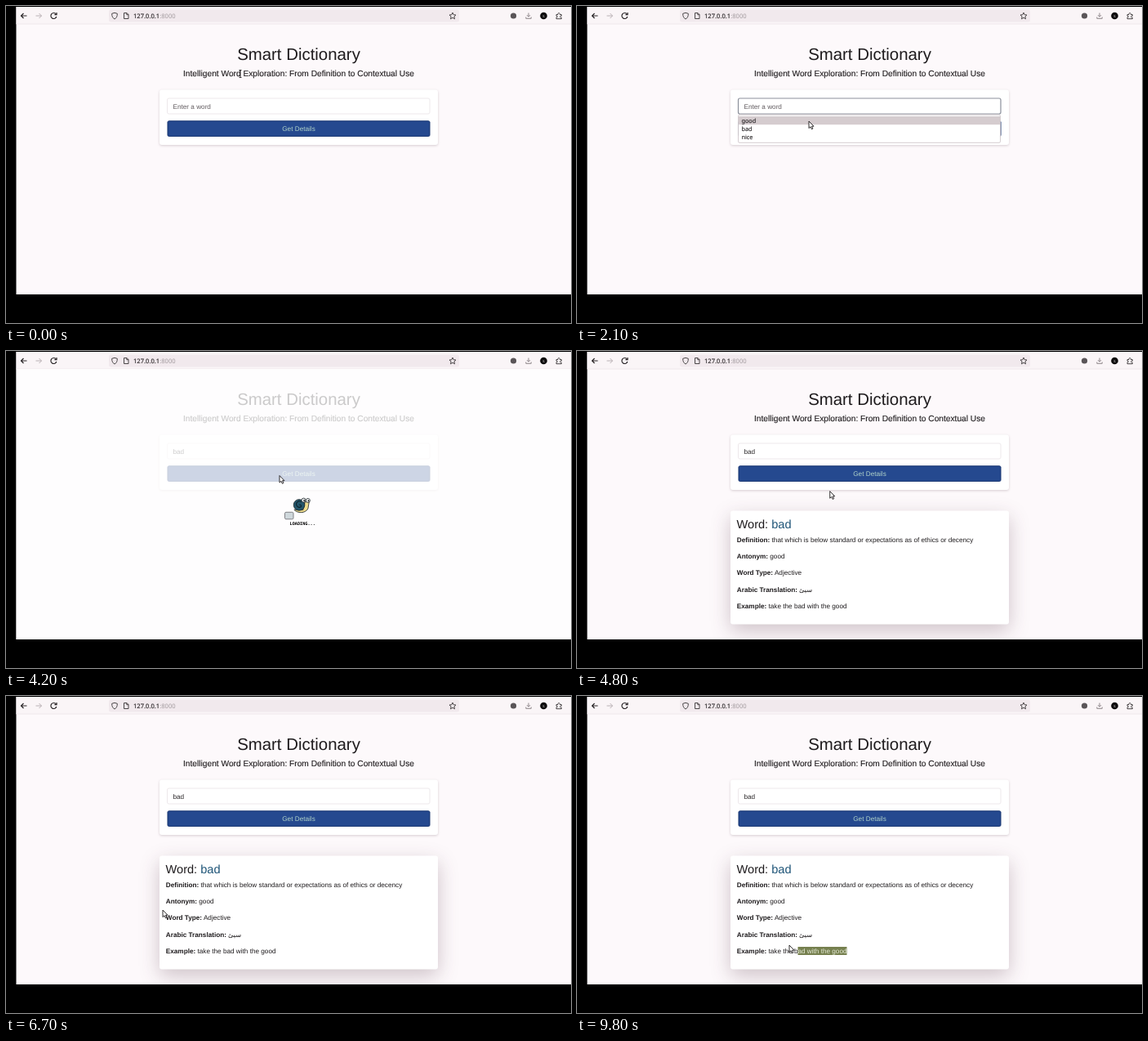
Write an HTML page that moves like this. It is 692 px wide and 388 px high and loops after 9.9 s.

```html
<!DOCTYPE html>
<html lang="en">
<head>
<meta charset="utf-8">
<title>Smart Dictionary</title>
<style>
  html, body { margin: 0; width: 100%; height: 100%; overflow: hidden; background: #000; }
  svg { display: block; width: 692px; height: 388px; text-rendering: geometricPrecision;
        font: 8.2px "Liberation Sans", Arial, sans-serif; }
  text { white-space: pre; }
  .b { font-weight: 700; }
  .mid { text-anchor: middle; }
  .ui { font-family: "Noto Sans", sans-serif; }
  .line { fill: none; stroke: #4a4648; stroke-width: 1; }
  .card { fill: #fff; filter: drop-shadow(0 1px 1.5px rgba(60, 30, 45, .2)); }
  .raised { fill: #fff; filter: drop-shadow(0 8px 12px rgba(60, 20, 40, .24)); }
</style>
</head>
<body>
<svg viewBox="0 0 692 388">
  <defs>
    <clipPath id="view"><rect x="12.5" y="22" width="680" height="331"/></clipPath>
    <clipPath id="selClip"><rect id="selArea"/></clipPath>
  </defs>
  <rect width="692" height="388"/>
  <rect x="12.5" y="1" width="680" height="352" fill="#fdf9fb"/>

  <!-- browser toolbar -->
  <rect x="12.5" y="1" width="680" height="21" fill="#faf5f7"/>
  <path d="M12.5 22H692" stroke="#ece4e8" stroke-width=".8"/>
  <rect x="126" y="4.5" width="429" height="15" rx="2.5" fill="#f1e9ed"/>
  <g class="line">
    <path d="M25.5 12H18.5M21.5 9L18.5 12L21.5 15" stroke="#2a2628" stroke-width="1.2"/>
    <path d="M36.5 12H43.5M40.5 9L43.5 12L40.5 15" stroke="#b9b1b5"/>
    <path d="M61 9.6A3.5 3.5 0 1 0 61.8 13M62 8V10.6H59.4" stroke="#2a2628" stroke-width="1.2"/>
    <path d="M133 8.3L136.3 9.3C136.4 12.5 135.5 14.6 133 16C130.5 14.6 129.6 12.5 129.7 9.3Z"/>
    <path d="M144.5 8.5H148L150 10.5V15.5H144.5ZM147.8 8.5V10.7H150"/>
    <path d="M547 8L548.2 10.7L551 11L548.9 12.9L549.5 15.8L547 14.3L544.5 15.8L545.1 12.9L543 11L545.8 10.7Z"/>
    <path d="M640 8.5V13M638 11.2L640 13.2L642 11.2M636.8 13.5V15.3H643.2V13.5" stroke="#8d8589"/>
    <path d="M674 10.5H676C675.5 7.8 678.8 7.8 678.3 10.5H680.3V12.2C677.9 11.8 677.9 14.6 680.3 14.2V15.7H674V13.9C676 14 676 12 674 12.2Z"/>
  </g>
  <circle cx="621.5" cy="12" r="3.6" fill="#5a5558"/>
  <circle cx="658.5" cy="12" r="4.3" fill="#0c0a0b"/>
  <text class="ui mid" x="658.5" y="13.9" font-size="5" fill="#ddd">s</text>
  <text class="ui" x="156" y="14.8" font-size="7.6" fill="#2b2729" stroke="#2b2729" stroke-width=".15">127.0.0.1<tspan fill="#a39b9f" stroke="none">:8000</tspan></text>

  <g clip-path="url(#view)">
    <g fill="#1e1b1d">
      <text class="mid" x="358.5" y="65.8" font-size="20.4">Smart Dictionary</text>
      <text class="mid" x="358.5" y="86.3" font-size="10.2" stroke="#1e1b1d" stroke-width=".12">Intelligent Word Exploration: From Definition to Contextual Use</text>
    </g>
    <rect class="card" x="188" y="102.5" width="341" height="67.5" rx="3"/>
    <rect id="field" x="197.5" y="113" width="321.5" height="19" rx="2" fill="#fff"/>
    <text id="entry" x="204.5" y="125.8"></text>
    <rect x="198" y="140.8" width="321" height="18.6" rx="1.5" fill="#25498f" stroke="#17346f"/>
    <text class="mid" x="358.5" y="153" fill="#b0d2c8">Get Details</text>

    <g id="list">
      <rect x="197.5" y="133.3" width="321" height="34" rx="1.5" fill="#fff" stroke="#c9c1c5" stroke-width=".8"/>
      <rect id="hover" x="198" width="320" height="10.2" fill="#d5cccf"/>
      <g class="ui" font-size="7.25" fill="#1e1b1d" stroke="#1e1b1d" stroke-width=".1">
        <text x="201.5" y="142.7">good</text>
        <text x="201.5" y="152.9">bad</text>
        <text x="201.5" y="163.1">nice</text>
      </g>
    </g>

    <g id="result">
      <rect class="raised" x="188" y="195.5" width="341" height="139" rx="3"/>
      <g fill="#1e1b1d">
        <g id="rows">
          <text x="195.5" y="217.2" font-size="14.6">Word: <tspan fill="#1f5578">bad</tspan></text>
          <text x="195.8" y="233.7"><tspan class="b">Definition:</tspan> that which is below standard or expectations as of ethics or decency</text>
          <text x="195.8" y="254"><tspan class="b">Antonym:</tspan> good</text>
          <text x="195.8" y="274.3"><tspan class="b">Word Type:</tspan> Adjective</text>
          <text x="195.8" y="294.6" class="b">Arabic Translation:</text>
          <text x="272" y="294.6" font-family="DejaVu Sans, sans-serif">سيئ</text>
          <text x="195.8" y="314.8"><tspan class="b">Example:</tspan> take the bad with the good</text>
        </g>
      </g>
      <g clip-path="url(#selClip)" fill="#e6ead8">
        <rect x="188" y="195" width="341" height="139" fill="#76804f"/>
        <use href="#rows"/>
      </g>
    </g>

    <g id="loading">
      <rect x="12" y="22" width="680" height="331" fill="#fff" opacity=".77"/>
      <rect id="tray" x="341.5" y="197.3" height="8.5" rx="1.5" fill="#cfd8dc" stroke="#77777c" stroke-width=".9"/>
      <g id="snail" stroke="#1b2428" stroke-width=".8">
        <path d="M353 194C357 198.5 367 198.5 370 192L371 184H366L364 194Z" fill="#efdc8d"/>
        <circle cx="359" cy="188" r="6.8" fill="#24566b"/>
        <path d="M359 188A1.6 1.6 0 0 1 361.4 190A3.6 3.6 0 1 1 361.6 184.5" fill="none" stroke="#0c2029" stroke-width="1"/>
        <circle cx="364.3" cy="182" r="2.5" fill="#fff"/>
        <circle cx="369.6" cy="182.2" r="2.5" fill="#fff"/>
        <circle cx="365" cy="182.3" r=".7"/>
        <circle cx="370.2" cy="182.5" r=".7"/>
      </g>
      <text id="label" x="348" y="213" font-size="5.2" class="b" font-family="DejaVu Sans Mono, monospace">LOADING...</text>
    </g>
  </g>

  <path id="beam" d="M-1.5 -4.5H1.5M0 -4.5V4.5M-1.5 4.5H1.5" fill="none" stroke="#2a2628" stroke-width=".9"/>
  <path id="arrow" d="M0 0V8.6L2 6.8L3.4 9.8L4.9 9.1L3.5 6.2H6Z" fill="#fff" stroke="#1a1718" stroke-width=".9"/>
</svg>
<script>
const LOOP = 9900, STEP = 100;
const $ = id => document.getElementById(id);
const set = (id, attrs) => { for (const k in attrs) $(id).setAttribute(k, attrs[k]); };
const show = (id, on) => { $(id).style.display = on ? "" : "none"; };
const mix = (a, b, u) => a + (b - a) * Math.min(1, Math.max(0, u));

// pointer stops: time, x, y
const stops = [
  [0, 287, 83], [1000, 287, 83], [1300, 286, 124], [1800, 286, 124],
  [2000, 284, 141], [2200, 284, 141], [2300, 284, 149], [2400, 284, 149],
  [2700, 335, 152.5], [4700, 335, 152.5], [5100, 234, 229], [5200, 234, 230],
  [5600, 273, 236], [5800, 290, 242], [6000, 290, 242], [6100, 270, 216],
  [6200, 270, 216], [6400, 197, 215], [6500, 197, 215], [6700, 192, 262],
  [6900, 192, 268], [7500, 271, 279], [7600, 271, 279], [7700, 281, 278],
  [8600, 281, 278], [8800, 196, 289], [9000, 287, 290], [9200, 336, 291],
  [9300, 336, 291], [9500, 331, 309], [9800, 260, 305]
];

// text drags: start, full, cleared, anchor x, moving x from, to, top, height
const drags = [
  [5200, 5600, 5700, 234, 234, 265.5, 226, 10],
  [5700, 5800, 6100, 234, 350, 485, 226, 10],
  [6300, 6400, 6600, 264, 230, 195, 204, 17],
  [6900, 7500, 8700, 195.5, 195.5, 276, 266.5, 10],
  [8800, 9000, 9200, 195.5, 195.5, 289, 286.5, 10],
  [9500, 9800, LOOP, 330.5, 330.5, 270.5, 307, 10]
];

function pointerAt(t) {
  const i = stops.findIndex(s => s[0] > t);
  if (i < 0) return stops.at(-1).slice(1);
  const [t0, x0, y0] = stops[i - 1], [t1, x1, y1] = stops[i];
  const u = (t - t0) / (t1 - t0);
  return [mix(x0, x1, u), mix(y0, y1, u)];
}

function drawSelection(t) {
  const drag = drags.find(d => t >= d[0] && t < d[2]);
  if (!drag) return set("selArea", { width: 0, height: 0 });
  const [start, full, , anchor, from, to, y, height] = drag;
  const x = mix(from, to, (t - start) / (full - start));
  set("selArea", { x: Math.min(x, anchor), y, width: Math.abs(x - anchor), height });
}

function drawLoading(t) {
  const phase = (t - 3200) / 800 * 2 * Math.PI, sway = Math.sin(phase);
  set("tray", { width: 7.5 + 3 * sway * sway });
  set("snail", { transform: `translate(0 ${0.5 * sway}) rotate(${2 * sway} 361 190)` });
  set("label", { x: 348 - 0.4 * sway });
}

function draw(t) {
  const focused = t >= 1500 && t < 2700, filled = t >= 2400;
  set("field", { stroke: focused ? "#8b909b" : "#e9e2e6", "stroke-width": focused ? 1.2 : 0.8 });
  $("entry").textContent = filled ? "bad" : "Enter a word";
  set("entry", { fill: filled ? "#2a2628" : "#615b5f" });

  show("list", t >= 1600 && t < 2400);
  show("hover", t >= 2000);
  set("hover", { y: t < 2300 ? 135 : 145.2 });

  show("loading", t >= 2800 && t < 4700);
  drawLoading(t);
  show("result", t >= 4700);
  drawSelection(t);

  const typing = t < 1900, [x, y] = pointerAt(t);
  show("beam", typing);
  show("arrow", !typing);
  set(typing ? "beam" : "arrow", { transform: `translate(${x} ${y})` });
}

const begin = performance.now();
function tick() {
  const t = (performance.now() - begin) % LOOP;
  draw(Math.floor(t / STEP) * STEP);
  requestAnimationFrame(tick);
}
tick();
</script>
</body>
</html>
```
